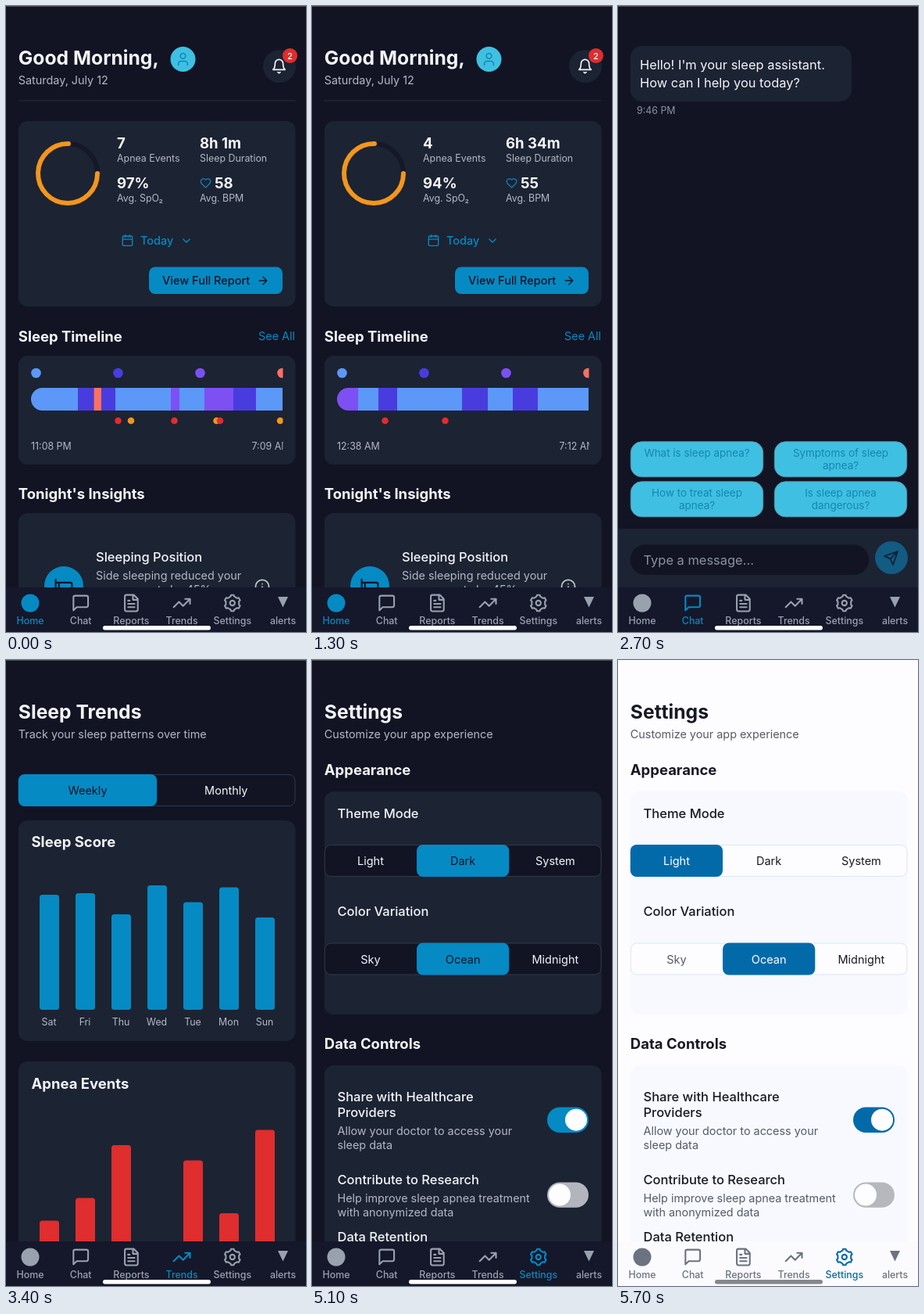
An HTML page for the animation above (5.8 s loop, 384 px wide and 800 px high).

```html
<!DOCTYPE html>
<html lang="en">
<head>
<meta charset="utf-8">
<title>Sleep app tour</title>
<style>
  html, body { margin: 0; width: 100%; height: 100%; overflow: hidden; background: #121424; }
  svg { display: block; width: 100vw; height: 100vh; font-family: Inter, Roboto, sans-serif; }
</style>
</head>
<body>
<svg id="stage" viewBox="0 0 384 800"></svg>
<script>
const LOOP = 5800;
const LEFT = 15.8, RIGHT = 370.5;
const DARK = {
  bg: '#121424', card: '#1c2333', nav: '#14182a', line: '#30384a', text: '#f3f5f9',
  soft: '#b3b8c4', dim: '#8b919f', tab: '#9aa1ae', main: '#058ac4', onMain: '#0e1424',
  off: '#b3b5be', bar: '#ffffff'
};
const LIGHT = {
  bg: '#fdfcff', card: '#f7f9fe', nav: '#fbfbfe', line: '#dce6f2', text: '#171923',
  soft: '#555a66', dim: '#6b7280', tab: '#6b7280', main: '#036aaa', onMain: '#ffffff',
  off: '#b7b7be', bar: '#85878e'
};
const BLUE = '#5b98f8', INDIGO = '#493cde', PURPLE = '#7d50f3', CORAL = '#fa7160';
const RED = '#e02d2d', ORANGE = '#f2961d', CYAN = '#3fc0e2';
let c = DARK;

const rect = (x, y, x2, y2, fill, r = 0, more = '') =>
  `<rect x="${x}" y="${y}" width="${x2 - x}" height="${y2 - y}" rx="${r}" fill="${fill}" ${more}/>`;
const dot = (x, y, r, fill) => `<circle cx="${x}" cy="${y}" r="${r}" fill="${fill}"/>`;
const text = (s, x, y, size, fill, weight = 400, anchor = 'start') =>
  `<text x="${x}" y="${y}" font-size="${size}" fill="${fill}" font-weight="${weight}" text-anchor="${anchor}">${s}</text>`;
const mid = (s, x, y, size, fill, weight) => text(s, x, y, size, fill, weight, 'middle');

// Sizes shared by the app's type scale
const title = (s, y = 75) => text(s, LEFT, y, 24.7, c.text, 700);
const head = (s, x, y) => text(s, x, y, 18.5, c.text, 700);
const item = (s, x, y) => text(s, x, y, 16.5, c.text, 500);
const body = (s, x, y) => text(s, x, y, 14.4, c.soft);
const small = (s, x, y, fill = c.soft) => text(s, x, y, 12.4, fill);
const card = (y, y2) => rect(LEFT, y, RIGHT, y2, c.card, 12);

function gear() {
  const pts = [];
  const at = (deg, r) => {
    const a = deg * Math.PI / 180;
    pts.push(`${(12 + r * Math.sin(a)).toFixed(2)} ${(12 - r * Math.cos(a)).toFixed(2)}`);
  };
  for (let a = 0; a < 360; a += 60) {
    at(a - 16, 8.3); at(a - 10, 10); at(a + 10, 10); at(a + 16, 8.3);
  }
  return `M${pts.join('L')}Z`;
}
const ring = r => `M${12 - r} 12a${r} ${r} 0 1 0 ${2 * r} 0a${r} ${r} 0 1 0 ${-2 * r} 0`;

const ICONS = {
  chat: 'M21 15a2 2 0 0 1-2 2H7l-4 4V5a2 2 0 0 1 2-2h14a2 2 0 0 1 2 2z',
  report: 'M15 2H6a2 2 0 0 0-2 2v16a2 2 0 0 0 2 2h12a2 2 0 0 0 2-2V7ZM14 2v6h6M10 9H8M16 13H8M16 17H8',
  trend: 'M22 7 13.5 15.5 8.5 10.5 2 17M16 7h6v6',
  gear: gear() + ring(3),
  user: 'M19 21v-2a4 4 0 0 0-4-4H9a4 4 0 0 0-4 4v2M8 7a4 4 0 1 0 8 0a4 4 0 1 0-8 0',
  bell: 'M6 8a6 6 0 0 1 12 0c0 7 3 9 3 9H3s3-2 3-9M10.3 21a1.94 1.94 0 0 0 3.4 0',
  heart: 'M19 14c1.5-1.5 3-3.2 3-5.5A5.5 5.5 0 0 0 16.5 3c-1.8 0-3 .5-4.5 2-1.5-1.5-2.7-2-4.5-2A5.5 5.5 0 0 0 2 8.5c0 2.3 1.5 4 3 5.5l7 7Z',
  date: 'M8 2v4M16 2v4M5 4h14a2 2 0 0 1 2 2v14a2 2 0 0 1-2 2H5a2 2 0 0 1-2-2V6a2 2 0 0 1 2-2M3 10h18',
  down: 'M6 9l6 6 6-6',
  right: 'M5 12h14M12 5l7 7-7 7',
  bed: 'M2 4v16M2 8h18a2 2 0 0 1 2 2v10M2 17h20M6 8v9',
  info: ring(10) + 'M12 16v-4M12 8h.01',
  send: 'M22 2l-7 20-4-9-9-4ZM22 2 11 13'
};
const icon = (name, x, y, size, color, w = 2) =>
  `<path d="${ICONS[name]}" transform="translate(${x - size / 2} ${y - size / 2}) scale(${size / 24})"
    fill="none" stroke="${color}" stroke-width="${w}" stroke-linecap="round" stroke-linejoin="round"/>`;

// Each segment is [colour, right edge]; events are [x, colour]
const NIGHTS = [
  {
    stats: ['7', '8h 1m', '97%', '58'], from: '11:08 PM', to: ['7:09 AM', 314.5],
    segs: [[BLUE, 92], [INDIGO, 112.5], [CORAL, 122], [INDIGO, 140], [BLUE, 211], [PURPLE, 222],
      [BLUE, 254], [PURPLE, 291], [INDIGO, 320], [BLUE, 354]],
    events: [[143.5, RED], [160, ORANGE], [215.5, RED], [269.5, ORANGE], [274, RED], [351, ORANGE]]
  },
  {
    stats: ['4', '6h 34m', '94%', '55'], from: '12:38 AM', to: ['7:12 AM', 316.5],
    segs: [[PURPLE, 59], [BLUE, 85], [INDIGO, 109], [BLUE, 192], [INDIGO, 225], [BLUE, 257],
      [INDIGO, 289], [BLUE, 354]],
    events: [[93.5, RED], [170.5, RED]]
  }
];

function timeline(night) {
  let x = 32;
  const segs = night.segs.map(([color, end]) => {
    const s = rect(x, 488, end, 517, color);
    x = end;
    return s;
  }).join('');
  const keys = [BLUE, INDIGO, PURPLE, CORAL].map((k, i) => dot(38.5 + i * 105, 469, 6.3, k)).join('');
  return card(447, 586) +
    `<clipPath id="pill"><path d="M354 488H46.5a14.5 14.5 0 0 0 0 29H354Z"/></clipPath>
     <clipPath id="view"><rect x="30" y="450" width="324.5" height="130"/></clipPath>
     <g clip-path="url(#pill)">${segs}</g><g clip-path="url(#view)">` + keys +
    night.events.map(([ex, color]) => dot(ex, 530, 4.3, color)).join('') +
    small(night.from, 32, 567) + small(night.to[0], night.to[1], 567) + '</g>';
}

function home(n) {
  const night = NIGHTS[n];
  const [apnea, sleep, oxygen, bpm] = night.stats;
  const stat = (s, x, y) => text(s, x, y, 18.6, c.text, 700);
  return title('Good Morning,') + body('Saturday, July 12', LEFT, 100) +
    dot(226.5, 68, 16, CYAN) + icon('user', 226.5, 68, 20, '#1287b4', 1.9) +
    dot(350, 77, 21, c.card) + icon('bell', 349.5, 77, 20.5, c.text, 2) +
    dot(363.5, 63.5, 9.5, RED) + mid('2', 363.5, 67.5, 11, '#fff', 500) +
    rect(LEFT, 120.5, RIGHT, 121.5, '#272d3c') +
    card(147, 384) +
    `<circle cx="79" cy="214" r="38" fill="none" stroke="#151828" stroke-width="6"/>
     <path d="M117 214A38 38 0 1 1 80 176" fill="none" stroke="${ORANGE}" stroke-width="6" stroke-linecap="round"/>` +
    stat(apnea, 142, 181.5) + small('Apnea Events', 142, 198.5) +
    stat(sleep, 248, 181.5) + small('Sleep Duration', 248, 198.5) +
    stat(oxygen, 142, 232.5) + small('Avg. SpO₂', 142, 249.5) +
    icon('heart', 255.5, 226.5, 15, c.main, 2) +
    stat(bpm, 267, 232.5) + small('Avg. BPM', 248, 249.5) +
    icon('date', 155.5, 299.5, 16.5, c.main) + text('Today', 172, 305, 14.5, c.main, 500) +
    icon('down', 231, 300, 16.5, c.main) +
    rect(183, 333.5, 354, 368, c.main, 8) + text('View Full Report', 200, 356, 14.5, c.onMain, 500) +
    icon('right', 329, 351, 16.5, c.onMain) +
    head('Sleep Timeline', LEFT, 428.5) + text('See All', 370, 427, 14.4, c.main, 400, 'end') +
    timeline(night) +
    head('Tonight\'s Insights', LEFT, 630) + card(648, 820) +
    dot(74, 741, 25, c.main) + icon('bed', 74, 741, 25, c.onMain) +
    item('Sleeping Position', 115, 710) + body('Side sleeping reduced your', 115, 733) +
    body('apnea events by 45%', 115, 751) + icon('info', 328, 742, 20.5, '#c5cad3');
}

function chat() {
  const ink = '#1685b2';
  const chip = (x, y, lines) =>
    rect(x + .3, y + .5, x + 169.7, y + 45.5, CYAN, 14, 'stroke="#5f93a5" stroke-width="1"') +
    lines.map((s, i) => mid(s, x + 85, y + 20 + i * 16, 13.45, ink)).join('');
  return rect(LEFT, 51, 299, 122, c.card, 15) +
    text('Hello! I\'m your sleep assistant.', 28, 81, 16.45, c.text) +
    text('How can I help you today?', 28, 104, 16.45, c.text) +
    small('9:46 PM', 24, 138, c.dim) +
    chip(16, 556.3, ['What is sleep apnea?']) + chip(200, 556.3, ['Symptoms of sleep', 'apnea?']) +
    chip(16, 607.3, ['How to treat sleep', 'apnea?']) + chip(200, 607.3, ['Is sleep apnea', 'dangerous?']) +
    rect(0, 668, 384, 743, c.card) + rect(LEFT, 688.5, 321, 727, c.bg, 19) +
    text('Type a message...', 32.5, 713.5, 16.45, c.dim) +
    dot(350, 705, 21, '#125b82') + icon('send', 349.5, 705.5, 20.5, '#102036');
}

function segments(y, names, active, faded) {
  const w = (RIGHT - LEFT) / names.length;
  const left = LEFT + active * w;
  return rect(LEFT + .5, y + .5, RIGHT - .5, y + 40.5, c.bg, 8, `stroke="${c.line}" stroke-width="1"`) +
    rect(left, y, left + w, y + 41, c.main, 8) +
    names.map((s, i) => {
      const color = i === active ? c.onMain : s === faded ? c.soft : c.text;
      return mid(s, LEFT + (i + .5) * w, y + 26, 14.5, color);
    }).join('');
}

function trends() {
  const days = ['Sat', 'Fri', 'Thu', 'Wed', 'Tue', 'Mon', 'Sun'];
  const bars = (tops, base, color) =>
    tops.map((top, i) => top < base ? rect(43 + i * 46, top, 68 + i * 46, base, color, 3.5) : '').join('');
  return title('Sleep Trends') + body('Track your sleep patterns over time', LEFT, 100) +
    segments(146, ['Weekly', 'Monthly'], 0) +
    card(205, 487) + head('Sleep Score', 32.5, 239) +
    bars([300, 298, 325, 288, 309.5, 290.5, 329], 447, c.main) +
    days.map((d, i) => mid(d, 55 + i * 46, 467, 12.4, c.soft)).join('') +
    card(513, 820) + head('Apnea Events', 32.5, 547.5) +
    bars([716.5, 687.5, 620, 755, 639.5, 707, 600.5], 755, RED);
}

function settings(theme, faded) {
  const toggle = (y, on) => rect(301, y - 16.2, 354, y + 16.2, on ? c.main : c.off, 16.2) +
    dot(on ? 338 : 317, y, 14, '#fdfcff');
  return title('Settings') + body('Customize your app experience', LEFT, 100) +
    head('Appearance', LEFT, 147) + card(168, 453) +
    item('Theme Mode', 32.5, 202) + segments(236, ['Light', 'Dark', 'System'], theme) +
    item('Color Variation', 32.5, 327) + segments(361.5, ['Sky', 'Ocean', 'Midnight'], 1, faded) +
    head('Data Controls', LEFT, 497) + card(518, 820) +
    item('Share with Healthcare', 32.5, 564) + item('Providers', 32.5, 584) +
    body('Allow your doctor to access your', 32.5, 607) + body('sleep data', 32.5, 625) +
    toggle(587.7, true) +
    item('Contribute to Research', 32.5, 669.5) +
    body('Help improve sleep apnea treatment', 32.5, 692.5) + body('with anonymized data', 32.5, 710.5) +
    toggle(683.6, false) + item('Data Retention', 32.5, 743);
}

function nav(active) {
  const tabs = [['Home'], ['Chat', 'chat'], ['Reports', 'report'], ['Trends', 'trend'],
    ['Settings', 'gear'], ['alerts']];
  return rect(0, 743, 384, 800, c.nav) + tabs.map(([name, pic], i) => {
    const x = 31 + i * 64.7;
    const color = name === active ? c.main : c.tab;
    const mark = pic ? icon(pic, x, 763, 25, color)
      : name === 'Home' ? dot(x, 763, 11.5, color)
      : `<path d="M${x - 6.5} 755h13l-6.5 13.5Z" fill="${color}"/>`;
    return mark + mid(name, x, 790, 12.4, color, 500);
  }).join('') + rect(124, 792, 262, 797.5, c.bar, 2.7);
}

const CUES = [
  [0, 'Home', DARK, () => home(0)],
  [300, 'Home', DARK, () => home(1)],
  [1500, 'Chat', DARK, chat],
  [3000, 'Trends', DARK, trends],
  [3800, 'Settings', DARK, () => settings(1)],
  [5200, 'Settings', LIGHT, () => settings(0)],
  [5600, 'Settings', LIGHT, () => settings(0, 'Sky')]
];

const stage = document.getElementById('stage');
let shown = null;

function show(cue) {
  if (cue === shown) return;
  shown = cue;
  const [, tab, theme, screen] = cue;
  c = theme;
  stage.innerHTML = rect(0, 0, 384, 800, c.bg) + screen() + nav(tab) +
    (c === DARK ? rect(0, 0, 384, 1, '#48494f') : '');
}

const start = performance.now();
function tick() {
  const t = Math.max(0, performance.now() - start) % LOOP;
  show(CUES.findLast(cue => cue[0] <= t));
  requestAnimationFrame(tick);
}
tick();
</script>
</body>
</html>
```
